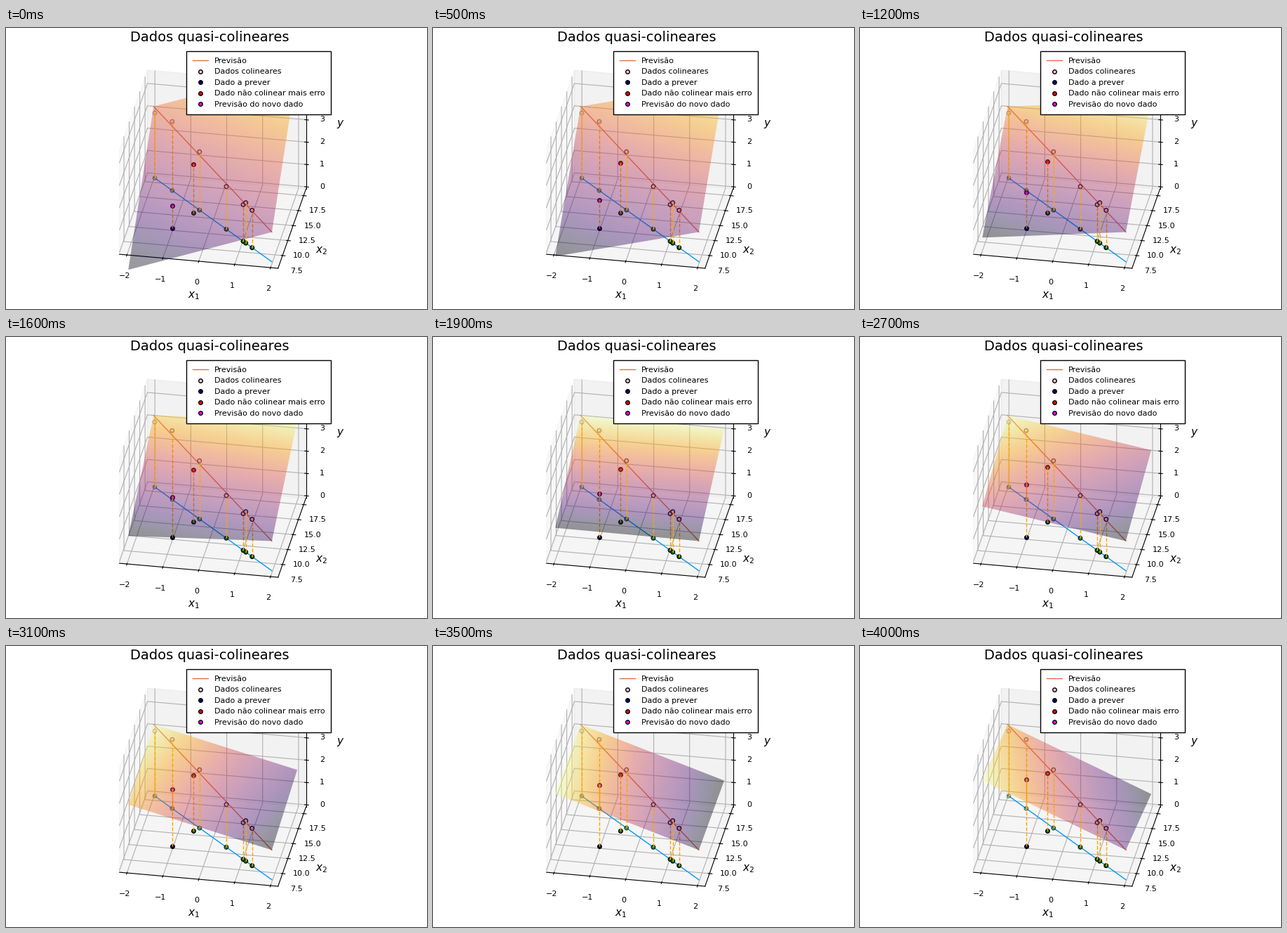
Write a matplotlib script that moves like this. It is 600 by 400 pixels and loops after 4.1 s.

```python
import numpy as np
import matplotlib.pyplot as plt
from matplotlib.animation import FuncAnimation
from matplotlib.colors import to_rgba
from matplotlib.patches import Polygon, Rectangle
from matplotlib.path import Path

W, H, DPI = 600, 400, 100
FRAMES, STEP_MS = 41, 100

plt.rcParams["font.family"] = "DejaVu Sans"
plt.rcParams["mathtext.fontset"] = "dejavusans"

# Orthographic view, azimuth -80 and elevation 30 degrees
AZIM, ELEV = np.radians(-80), np.radians(30)
SIDE = 229.5
CORNER = np.array([161.7, 322.1])
EDGE_1 = SIDE * np.array([-np.sin(AZIM), np.sin(ELEV) * np.cos(AZIM)])
EDGE_2 = SIDE * np.array([np.cos(AZIM), np.sin(ELEV) * np.sin(AZIM)])
EDGE_3 = SIDE * np.array([0, -0.75 * np.cos(ELEV)])
LIMITS = ((-2.12, 2.12), (5.64, 18.36), (0, 4.5))
PAD = 0.02  # share of each box edge beyond the limits

SAMPLE, FIT_LINE, ORANGE = "pink", "#e36f47", "#ffa500"


def box(a, b, c):
    """Pixel position of a point given as shares of the box edges."""
    return CORNER + np.multiply.outer(a, EDGE_1) \
        + np.multiply.outer(b, EDGE_2) + np.multiply.outer(c, EDGE_3)


def share(axis, value):
    low, high = LIMITS[axis]
    return PAD + (1 - 2 * PAD) * (np.asarray(value, float) - low) / (high - low)


def project(x1, x2, y):
    return box(share(0, x1), share(1, x2), share(2, y))


def collinear(x1):
    return 12 - 3 * np.asarray(x1, float)


def fit(x1):
    return 2.248 - 0.459 * np.asarray(x1, float)


def plane(x1, x2, tilt):
    return fit(x1) + tilt * (x2 - collinear(x1))


def depth_alpha(x1, x2, y):
    near = (np.cos(ELEV) * np.cos(AZIM) * share(0, x1)
            + np.cos(ELEV) * np.sin(AZIM) * share(1, x2)
            + np.sin(ELEV) * 0.75 * share(2, y))
    return 0.3 + 0.7 * (near - near.min()) / np.ptp(near)


fig = plt.figure(figsize=(W / DPI, H / DPI), dpi=DPI, facecolor="white")
ax = fig.add_axes([0, 0, 1, 1])

# Surface image, cut to the projected plane in every frame
cols, rows = np.meshgrid(np.arange(W) + 0.5, np.arange(H) + 0.5)
surface = ax.imshow(np.zeros((H, W)), cmap="inferno", vmin=0, vmax=1,
                    alpha=0.4, extent=(0, W, H, 0), aspect="auto",
                    interpolation="nearest", zorder=10)
ax.set_xlim(0, W)
ax.set_ylim(H, 0)
ax.axis("off")


def segment(p, q, color, width, zorder, **style):
    return ax.plot([p[0], q[0]], [p[1], q[1]], color=color, lw=width,
                   zorder=zorder, **style)[0]


def dots(points, color, zorder, alphas=(1,)):
    points = np.atleast_2d(points)
    return ax.scatter(points[:, 0], points[:, 1], s=16, linewidths=1,
                      facecolors=[to_rgba(color, a) for a in alphas],
                      edgecolors=[to_rgba("black", a) for a in alphas],
                      zorder=zorder)


def label(x, y, text, size=8, ha="center", zorder=3):
    ax.text(x, y, text, fontsize=size, ha=ha, va="baseline", zorder=zorder)


def draw_box():
    panes = (
        ("0.95", [(0, 0, 0), (0, 1, 0), (0, 1, 1), (0, 0, 1)]),
        ("0.90", [(0, 1, 0), (1, 1, 0), (1, 1, 1), (0, 1, 1)]),
        ("0.925", [(0, 0, 0), (1, 0, 0), (1, 1, 0), (0, 1, 0)]),
    )
    for gray, corners in panes:
        ax.add_patch(Polygon([box(*c) for c in corners], facecolor=gray,
                             edgecolor=gray, alpha=0.5, lw=1, zorder=0))

    def grid(*corners):
        pts = np.array([box(*c) for c in corners])
        ax.plot(pts[:, 0], pts[:, 1], color="#b0b0b0", lw=0.8, zorder=1)

    def tick(at, outward):
        segment(at + outward / 60, at - outward / 120, "black", 0.8, 2)

    for value in range(-2, 3):
        a = share(0, value)
        grid((a, 0, 0), (a, 1, 0), (a, 1, 1))
        at = box(a, 0, 0)
        tick(at, -0.96 * EDGE_2)
        label(at[0] - 3.4, at[1] + 33, str(value).replace("-", "\u2212"))
    for value in np.arange(7.5, 18, 2.5):
        b = share(1, value)
        grid((1, b, 0), (0, b, 0), (0, b, 1))
        at = box(1, b, 0)
        tick(at, 0.96 * EDGE_1)
        label(at[0] + 20, at[1] + 24.7, f"{value:.1f}")
    for value in range(5):
        c = share(2, value)
        grid((0, 0, c), (0, 1, c), (1, 1, c))
        at = box(1, 1, c)
        tick(at, 0.96 * EDGE_1)
        label(at[0] + 22.8, at[1] + 2.6, str(value))

    ends = [box(*c) for c in ((0, 0, 0), (1, 0, 0), (1, 1, 0), (1, 1, 1))]
    for p, q in zip(ends, ends[1:]):
        segment(p, q, "black", 0.8, 2)

    label(267.5, 384.5, "$x_1$", 11)
    label(450, 320, "$x_2$", 11)
    label(477, 140, "$y$", 11)
    label(290, 19.4, "Dados quasi-colineares", 14)


def draw_legend():
    ax.add_patch(Rectangle((256.5, 32.5), 206, 90, facecolor="white",
                           edgecolor="black", lw=1, zorder=20))
    entries = (("Previsão", None), ("Dados colineares", SAMPLE),
               ("Dado a prever", "navy"),
               ("Dado não colinear mais erro", "red"),
               ("Previsão do novo dado", "magenta"))
    for i, (text, color) in enumerate(entries):
        y = 46.3 + 15.5 * i
        if color:
            dots((276.8, y), color, 21)
        else:
            segment((265.7, y), (287.9, y), FIT_LINE, 1, 21)
        label(297, y + 3.6, text, ha="left", zorder=21)


draw_box()
draw_legend()

# Lines on the floor and on the plane
span = np.array([-2, 2])
segment(*project(span, collinear(span), [0, 0]), "#009af9", 1, 4)
segment(*project(span, collinear(span), fit(span)), FIT_LINE, 1, 5)

# Samples: x1, y, and whether the dashed drop lies over the surface
samples = ((-1.96, 2.91, True), (-1.37, 3.085, False), (-0.448, 2.607, True),
           (0.458, 1.909, True), (1.03, 1.638, False), (1.117, 1.808, True),
           (1.331, 1.673, False))
xs, ys, over = (np.array(col) for col in zip(*samples))
zeros = np.zeros(len(xs))
feet = project(xs, collinear(xs), zeros)
tops = project(xs, collinear(xs), ys)
dots(feet, "green", 6, depth_alpha(xs, collinear(xs), zeros))
dots(tops, SAMPLE, 7, depth_alpha(xs, collinear(xs), ys))
for foot, top, front in zip(feet, tops, over):
    segment(foot, top, ORANGE, 1, 11 if front else 9, ls="--")

# The off-line sample and the new point, both moving with the plane
OUTLIER, NEW = (-0.59, 12.8), (-1, 10)
movers = []
for spot, foot_color, top_color in ((OUTLIER, "green", "red"),
                                    (NEW, "navy", "magenta")):
    foot = project(*spot, 0)
    dots(foot, foot_color, 6)
    head = dots(foot, top_color, 8)
    drop = segment(foot, foot, ORANGE, 1, 9, ls="--")
    movers.append((spot, foot, head, drop))


def update(frame):
    tilt = 0.341 - 0.01 * frame
    x1 = np.array([-2, 2, 2, -2])
    x2 = np.array([6, 6, 18, 18])
    y = plane(x1, x2, tilt)
    quad = project(x1, x2, y)

    # Height is linear across the projected plane
    basis = np.column_stack((quad[1] - quad[0], quad[3] - quad[0]))
    slope = np.array([y[1] - y[0], y[3] - y[0]]) @ np.linalg.inv(basis)
    height = y[0] + slope[0] * (cols - quad[0, 0]) \
        + slope[1] * (rows - quad[0, 1])
    surface.set_data(np.clip((height - y.min()) / np.ptp(y), 0, 1))
    outline = Path(np.vstack((quad, quad[:1])), closed=True)
    surface.set_clip_path(outline, ax.transData)

    for spot, foot, head, drop in movers:
        top = project(*spot, plane(*spot, tilt))
        head.set_offsets([top])
        drop.set_data([foot[0], top[0]], [foot[1], top[1]])
    return [surface]


anim = FuncAnimation(fig, update, frames=FRAMES, interval=STEP_MS,
                     repeat=True, repeat_delay=0, blit=False)
plt.show()
```
